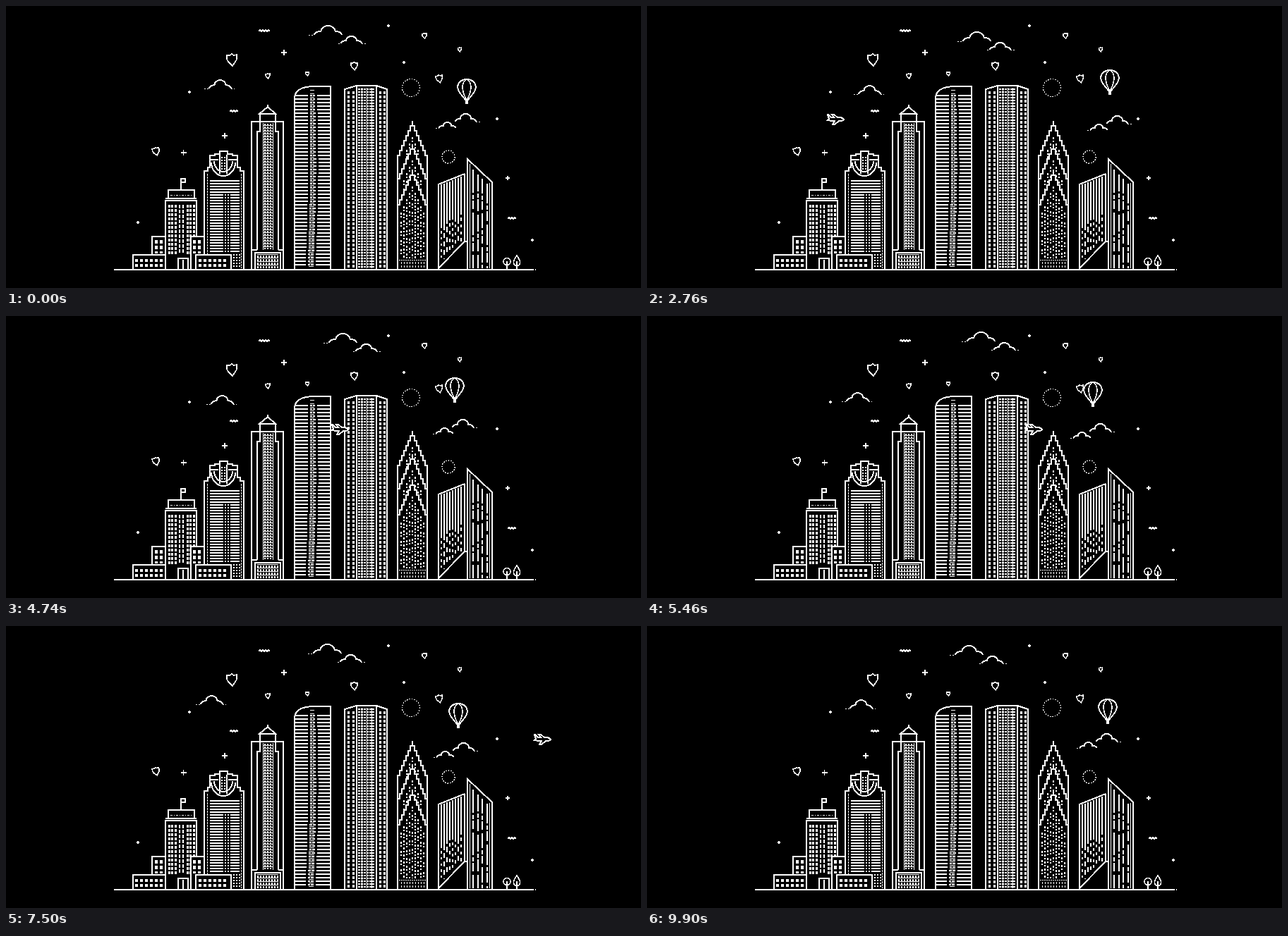
An HTML page for the animation above (9930 ms loop, 900 px wide and 400 px high).

```html
<!DOCTYPE html>
<html lang="en">
<head>
<meta charset="utf-8">
<title>City skyline</title>
<style>
html, body { margin: 0; width: 100%; height: 100%; overflow: hidden; background: #000; }
svg { display: block; width: 900px; height: 400px; fill: none; stroke: #fff; stroke-width: 2; shape-rendering: crispEdges; }
.solid { fill: #000; }
.gap { stroke: #000; }
</style>
</head>
<body>
<svg id="stage" viewBox="0 0 900 400"></svg>
<script>
const LOOP = 9930, STEP = 30, GROUND = 374;
const stage = document.getElementById('stage');

let seed = 7;
const random = () => (seed = seed * 16807 % 2147483647) / 2147483647;

const range = (a, b, step) => Array.from({ length: Math.floor((b - a) / step) + 1 }, (_, i) => a + i * step);
const path = (d, width = 2, dash = '', kind = '') =>
  `<path class="${kind}" d="${d}" stroke-width="${width}" stroke-dasharray="${dash}"/>`;
const solid = d => path(d, 2, '', 'solid');
const box = (x1, y1, x2, y2 = GROUND) => solid(`M${x1} ${y2}V${y1}H${x2}V${y2}`);
const cols = (x1, x2, step, y1, y2) => range(x1, x2, step).map(x => `M${x} ${y1}V${y2}`).join('');
const rows = (x1, x2, y1, y2, step) => range(y1, y2, step).map(y => `M${x1} ${y}H${x2}`).join('');

function roundHead() {
  return solid('M281 374V234H286V229H289V212H296V210H303V206H314V210H321V212H328V229H332V234H337V374')
    + path('M291 222A17 19 0 0 0 325 222M295 220A13 15 0 0 0 321 220M303 211V238M313 211V238M289 218H301M315 218H328')
    + path(cols(306, 310, 4, 214, 236), 2, '2 2')
    + path(cols(285.5, 333.5, 48, 238, 372), 1, '3 1')
    + path(rows(289, 331, 248, 264, 4))
    + path(rows(289, 331, 268, 348, 4), 2, '19 2 2 2 2 2')
    + path(cols(323, 331, 4, 352, 372), 2, '2 2');
}

function cityHall() {
  return solid('M226 374V276H270V374M226 273H270M230 273V261H267V273M248 261V245H254V250H248')
    + path('M233 268.5H265', 1, '3 2 1 2')
    + path(cols(231, 240, 4.5, 282, 352) + cols(257, 266, 4.5, 282, 352), 3, '4 2')
    + path(cols(246, 251, 5, 282, 352), 2, '5 2')
    + box(207, 327, 226) + box(262, 327, 281)
    + path(cols(213, 220, 7, 332, 351) + cols(267, 275, 7, 332, 351), 4, '5 3')
    + box(180, 353, 226) + box(269, 353, 319)
    + path(cols(185, 222, 7, 359, 370) + cols(275, 315, 7, 359, 370), 4, '4 3')
    + box(244, 358, 258) + path('M251 360V374');
}

function spire() {
  return solid('M348 374V164H393V374M360 164V153H382V164M359 153L371 143L382 153ZM371 140V144M356 346V178H360V164M386 346V178H382V164M348 346H356M386 346H393M353 374V350H389V374')
    + path(cols(364, 378, 14, 166, 346), 1)
    + path(cols(367, 375, 4, 167, 345), 2, '3 1')
    + path(rows(365, 378, 169.5, 344, 4), 1)
    + path(cols(357, 385, 4, 354, 372), 2, '3 2')
    + path(rows(356, 386, 352.5, 372, 5), 1);
}

function curvedTower() {
  return path(rows(410, 459, 127, 371, 5))
    + path(rows(429, 437, 119.5, 371, 5), 1)
    + path('M429 116Q432 240 426 373M439 116Q444 240 437 373', 3, '', 'gap')
    + path('M434 116Q437 240 431 373', 1, '3 2', 'gap')
    + path('M409 374V131Q409 115 435 114H460V374');
}

function hexTower() {
  return path('M480 374V118L497 113H525L540 118V374M497 113V374M525 113V374')
    + path(cols(485, 492, 7, 121, 372) + cols(530, 536, 6, 121, 372), 3, '4 2')
    + path(rows(499, 523, 118, 371, 4), 2, '3 1')
    + path(cols(504.5, 518.5, 7, 116, 372), 1);
}

function steppedTower() {
  const chevron = top => solid(`M555 374V${top + 49}${'h3v-7'.repeat(7)}${'v7h3'.repeat(7)}V374`);
  const windows = (x1, x2, top, end) => range(x1, x2, 4)
    .map(x => path(`M${x} ${top + Math.abs(x - 576) * 2.3}V${end}`, 2, `3 2 2 ${2 + Math.round(random() * 5)}`)).join('');
  return chevron(163) + windows(568, 584, 186, 240)
    + chevron(196) + windows(564, 588, 219, 290)
    + chevron(233) + windows(560, 592, 256, 358)
    + path('M557 360.5H597', 1, '2 1')
    + path(cols(560, 592, 4, 363, 372), 1, '3 2');
}

function slantedTowers() {
  const ribs = range(617, 646, 4).map(x => {
    const top = 255 - (x - 613) * .4, end = 367 - (x - 613);
    const cut = 295 + random() * 25;
    return path(`M${x} ${top}V${cut}`) + path(`M${x} ${cut + 4}V${end}`, 2, `${3 + random() * 5} ${3 + random() * 4}`);
  }).join('');
  const slits = range(662, 682, 6.5)
    .map(x => path(`M${x} ${232 + (x - 662)}V372`, 2, `${20 + random() * 25} 3 6 2 ${8 + random() * 9} 5`)).join('');
  return path('M613 374V253L650 238M650 238V334L613 372M654 374V217L689 250V374M650 334H654')
    + ribs + slits + path('M657.5 224V372M685.5 251V372', 1);
}

const ground = () => path('M153 374H748M750 374H751')
  + '<circle cx="710" cy="362.5" r="5" stroke-width="1.6"/>'
  + path('M710 362V374M724 362V374M724 354Q715 366 724 369Q733 366 724 354Z', 1.6);

const shield = (x, y, size, turn = 0) =>
  `<g transform="translate(${x} ${y}) rotate(${turn}) scale(${size})">`
  + path('M-7 -6L-3 -6L0 -8L3 -6L7 -7Q8 0 5 3L1 9L-5 3Q-8 -1 -7 -6Z', 1.6 / size) + '</g>';
const spark = (x, y, r, width = 1.5) => path(`M${x - r} ${y}H${x + r}M${x} ${y - r}V${y + r}`, width);
const wave = (x, y, n) => path(`M${x} ${y}` + 'l2 -2l2 2'.repeat(n), 1.6);
const ring = (x, y, r) => `<circle cx="${x}" cy="${y}" r="${r}" stroke-width="1.4" stroke-dasharray="1.5 2"/>`;

const sky = () => shield(320, 76, 1) + shield(212.5, 206, .68, -10) + shield(371, 99, .42) + shield(427, 96, .34)
  + shield(493.5, 85, .65) + shield(593, 42, .45) + shield(643, 61.5, .34) + shield(614, 103, .65, -8)
  + spark(394, 66, 4) + spark(251.5, 208, 4) + spark(310, 184, 4) + spark(710.5, 243.5, 3, 2)
  + spark(541.5, 27.5, 2, 2) + spark(564, 80, 2, 2) + spark(260, 122, 2, 2)
  + spark(187, 307, 2, 2) + spark(745.5, 331.5, 2, 2) + spark(695.5, 160, 2, 2)
  + wave(358, 36, 4) + wave(317, 150, 3) + wave(711, 302, 3)
  + ring(574, 116, 12.5) + ring(627, 214, 9);

// Three bumps on a dotted base line.
function cloud(x, y, w, h, left = 0, right = 0) {
  const side = `${w * .24} ${h * .4} 0 0 1 ${w * .24}`;
  return path(`M${x} ${y}a${side} ${-h * .4}a${w * .26} ${h * .6} 0 0 1 ${w * .52} 0a${side} ${h * .4}`)
    + path(`M${x - left} ${y + .5}H${x}M${x + w} ${y + .5}H${x + w + right}`, 1, '2 2');
}

const balloon = () => solid('M651 133L643 123Q640 119 640 114Q642 104 653 104Q664 104 666 114Q666 119 663 123L655 133Z')
  + path('M652 132Q647 122 647 114Q648 106 653 104Q658 106 659 114Q659 122 654 132', 1.6)
  + path('M653 131V139', 4);

const plane = () => path('M24 0Q22 -3 18 -3H15L10 -7H7L10 -3H6L2 -7H1L3 -1L1 1L7 2H11L8 7H11L17 2H20Q23 2 24 0Z', 2, '', 'solid');

// Offsets at evenly spaced moments of the loop.
const movers = {
  topCloud: {
    art: cloud(437, 41, 39, 13, 8, 0) + cloud(475, 53, 29, 10, 4, 7),
    x: [0, 4, 14, 21, 3, -2], y: [0, 4, 10, -4, -5, 0]
  },
  leftCloud: {
    art: cloud(288, 117, 31, 12, 7, 5),
    x: [0, 5, 14, 1, -18, -5], y: [0, 5, 9, 7, -4, -5]
  },
  rightCloud: {
    art: cloud(637, 164, 29, 11, 0, 7) + cloud(614, 173, 23, 8, 5, 0),
    x: [0, 5, 17, -6, -10, 3], y: [0, 6, 1, -5, 16, 8]
  },
  balloon: {
    art: balloon(),
    x: [0, 4, 0, -19, -20, -5], y: [0, -5, -16, -15, 5, 5]
  }
};

// Smooth closed curve through evenly spaced values.
function curve(values, phase) {
  const n = values.length, i = Math.floor(phase * n), u = phase * n - i;
  const [a, b, c, d] = range(-1, 2, 1).map(k => values[(i + k + n) % n]);
  return Math.round(b + u / 2 * (c - a + u * (2 * a - 5 * b + 4 * c - d + u * (3 * (b - c) + d - a))));
}

const group = (id, art) => `<g id="${id}">${art}</g>`;
stage.innerHTML = roundHead() + cityHall() + spire() + curvedTower() + hexTower() + steppedTower()
  + slantedTowers() + ground() + sky()
  + Object.keys(movers).map(id => group(id, movers[id].art)).join('') + group('plane', plane());

const node = id => document.getElementById(id);
const place = (id, x, y) => node(id).setAttribute('transform', `translate(${x} ${y})`);

function draw() {
  const tick = Math.floor(performance.now() % LOOP / STEP);
  const t = tick < 2 ? 0 : tick * STEP;
  for (const id in movers) place(id, curve(movers[id].x, t / LOOP), curve(movers[id].y, t / LOOP));
  place('plane', Math.round(t * .1038 - 31), 161);
  node('plane').style.display = t >= 615 && t < 8370 ? '' : 'none';
  requestAnimationFrame(draw);
}
draw();
</script>
</body>
</html>
```
